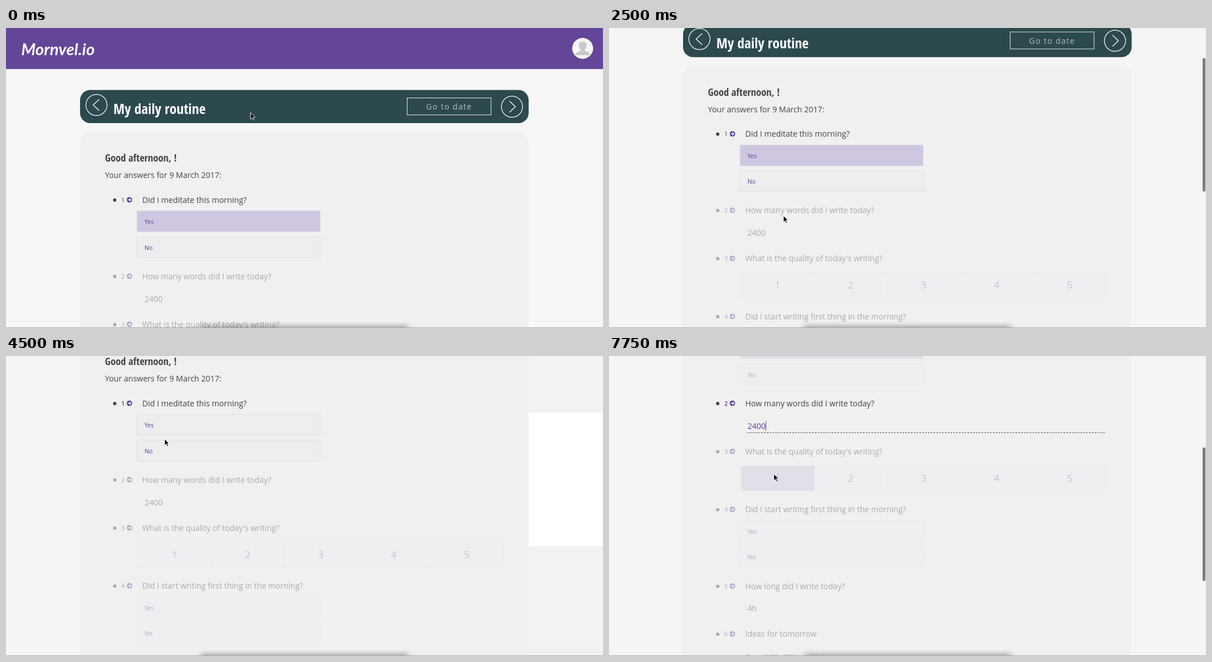
Animation of 1056 by 530 pixels, one loop 8000 ms. Source, as an HTML page:

```html
<!DOCTYPE html>
<html lang="en">
<head>
<meta charset="utf-8">
<title>Daily routine form</title>
<style>
  html, body { margin: 0; width: 100%; height: 100%; overflow: hidden; background: #f6f6f6; }
  svg { display: block; width: 1056px; height: 530px; font: 14px "Open Sans", sans-serif; }
  text { white-space: pre; }
  .narrow { font-family: "Open Sans Condensed", "Roboto Condensed", "Noto Sans", sans-serif; font-weight: 300; font-stretch: 62.5%; }
  .logo { font: italic 700 29px Lato, sans-serif; }
  .small { font-size: 10.5px; }
  .scale { font-size: 17px; font-weight: 300; text-anchor: middle; }
</style>
</head>
<body>
<svg id="stage" viewBox="0 0 1056 530"></svg>
<script>
const stage = document.getElementById('stage');
const STEP = 250, LOOP = 8000;
const PURPLE = '#5d3c98', DARK = '#444', FIELD = '#eceef0', CHOSEN = '#cfc6e1';

// [step, value...]: each entry holds until the next one
const scrolls = [[0, 0], [9, 58], [10, 116.5], [14, 220], [26, 355]];
const pointer = [
  [0, 432, 149], [1, 366, 229], [5, 350, 255], [6, 335, 285], [7, 318, 312], [8, 308, 331],
  [11, 302, 290], [12, 295, 245], [13, 291, 219], [16, 289, 190], [17, 285, 165], [18, 280, 146],
  [19, 275, 124], [21, 275, 150], [22, 276, 210], [23, 277, 254], [24, 275, 258], [25, 275, 260],
  [27, 272, 255], [28, 268, 240], [29, 262, 228], [30, 254, 217], [31, 291, 208]
];
const held = (list, step) => list.filter(e => e[0] <= step).pop().slice(1);

const rect = (x, y, w, h, fill, extra = '') =>
  `<rect x="${x}" y="${y}" width="${w}" height="${h}" fill="${fill}" ${extra}/>`;
const text = (x, y, str, fill, extra = '') => `<text x="${x}" y="${y}" fill="${fill}" ${extra}>${str}</text>`;
const line = (d, stroke, width = 1, extra = '') =>
  `<path d="${d}" fill="none" stroke="${stroke}" stroke-width="${width}" ${extra}/>`;
const circle = (x, y, r, extra) => `<circle cx="${x}" cy="${y}" r="${r}" ${extra}/>`;

// Condensed heading at the largest size that keeps to its space
function heading(x, y, str, fill, size, space) {
  stage.innerHTML = text(0, 0, str, fill, `class="narrow" font-size="${size}"`);
  const fitted = size * Math.min(1, space / stage.firstChild.getComputedTextLength());
  return text(x, y, str, fill, `class="narrow" font-size="${fitted}"`);
}
const title = heading(190, 152, 'My daily routine', '#fff', 34, 163);
const greeting = heading(175, 236, 'Good afternoon, !', DARK, 26, 127);

function option(y, label, chosen) {
  return rect(231.5, y + .5, 324.5, 37, chosen ? CHOSEN : FIELD, 'stroke="#dde0e3"') +
    text(245, y + 23.5, label, PURPLE, 'class="small"');
}
const yesNo = (y, chosen) => option(y, 'Yes', chosen) + option(y + 45.5, 'No', false);

function scale(y, hover) {
  let out = rect(234, y, 646, 43.5, FIELD, 'stroke="#dde0e3"');
  for (let i = 0; i < 5; i++) {
    const x = 234 + i * 129.3;
    if (!i && hover) out += rect(x, y, 129, 43.5, CHOSEN);
    if (i) out += line(`M${x} ${y}v43.5`, '#dde0e3');
    out += text(x + 64, y + 27, i + 1, PURPLE, 'class="scale"');
  }
  return out;
}

function question(n, y, label, body, active, bold) {
  return `<g opacity="${active ? 1 : .4}">` +
    circle(192.3, y + .5, 2.9, `fill="${DARK}"`) +
    text(204, y + 4, n, active && !bold ? DARK : PURPLE, `class="small" font-weight="${bold ? 600 : 400}"`) +
    circle(218.3, y, 4.8, `fill="${PURPLE}"`) +
    line(`M215.3 ${y}h5.4m-2.4-2.6l2.6 2.6-2.6 2.6`, '#fff', 1.3) +
    text(241, y + 5, label, DARK) + body + '</g>';
}

function header() {
  return rect(0, 0, 1056, 72.5, '#644699') +
    text(27, 48, 'Mornvel.io', '#fff', 'class="logo"') +
    circle(1020, 36, 18.5, 'fill="#f5f6f5"') +
    '<path d="M1007 48q1-6 8-7l2-2q-4-4-4-9 0-6 7-6t7 6q0 5-4 9l2 2q7 1 8 7z" fill="#c8cac9"/>' +
    rect(131, 109.5, 793.5, 58.5, '#2c494d', 'rx="18"') + title +
    circle(160, 136, 18.7, 'fill="none" stroke="#fff" stroke-width="1.2"') +
    line('M165 126l-11 10 11 10', '#fff', 1.3) +
    circle(895, 139, 18.7, 'fill="none" stroke="#fff" stroke-width="1.2"') +
    line('M890.5 129l10.500 10-10.500 10', '#fff', 1.3) +
    rect(709.5, 123.5, 148.5, 30, 'none', 'stroke="#e6eaea"') +
    text(743, 144, 'Go to date', '#b4bfc0', 'letter-spacing="1.3"');
}

function form(step) {
  const second = step >= 26;
  const chosen = step < 14 || step >= 19;
  const focused = step >= 14;
  const words = text(245, 483.5, '2400', second ? PURPLE : DARK) +
    (second ? line('M277.5 470v17', PURPLE) + line('M244 490.500H877', '#555', 1, 'stroke-dasharray="3 2"') : '');
  return rect(131, 183, 793, 1000, '#f0f0f0', 'rx="18"') + greeting +
    text(175, 265, 'Your answers for 9 March 2017:', DARK) +
    question(1, 303.5, 'Did I meditate this morning?', yesNo(322.5, chosen), !second, focused && !second) +
    question(2, 438.5, 'How many words did I write today?', words, second, second) +
    question(3, 523.5, "What is the quality of today's writing?", scale(549.5, step >= 29)) +
    question(4, 626, 'Did I start writing first thing in the morning?', yesNo(645, false)) +
    question(5, 761.5, 'How long did I write today?', text(245, 806, '4h', DARK)) +
    question(6, 846, 'Ideas for tomorrow',
      text(243, 889, 'To use  SHIFT + ENTER  to add a line', DARK, 'font-size="9"'));
}

const defs = `<defs><filter id="blur" x="-20%" y="-200%" width="140%" height="500%">
  <feGaussianBlur stdDeviation="5"/></filter></defs>`;

function draw(step) {
  const [scroll] = held(scrolls, step), [x, y] = held(pointer, step);
  const idle = step >= 16 && step < 26;
  const bar = step >= 9 && !idle;
  const bg = step < 10 ? '#f7f7f7' : '#f5f5f5';
  stage.innerHTML = defs + rect(0, 0, 1056, 530, bg) +
    (step >= 14 && step < 26 ? rect(924, 0, 132, 530, '#f2f2f2') : '') +
    (idle ? rect(924.5, 100, 131.5, 236, '#fff') : '') +
    `<g transform="translate(0 ${-scroll})">${header()}` +
    (step >= 1 && step < 9 ? rect(365, 168, 76.5, 14.5, '#fff') : '') + form(step) + '</g>' +
    (bar ? rect(1050, scroll * .455, 5, 236, '#7c7c7c', 'rx="2.5"') : '') +
    rect(345, 527, 366, 8, '#000', 'opacity=".4" filter="url(#blur)"') +
    rect(0, 529, 1056, 1, '#a8a8a8') +
    `<path transform="translate(${x} ${y})" d="M.5 .5v11.500l2.700-2.500 1.900 4.200 2-.9-1.900-4h3.600z"
      fill="#000" stroke="#fff" stroke-width=".9"/>`;
}

let shown = -1;
function tick(now) {
  const step = Math.floor(now % LOOP / STEP);
  if (step !== shown) draw(shown = step);
  requestAnimationFrame(tick);
}
tick(performance.now());
</script>
</body>
</html>
```
